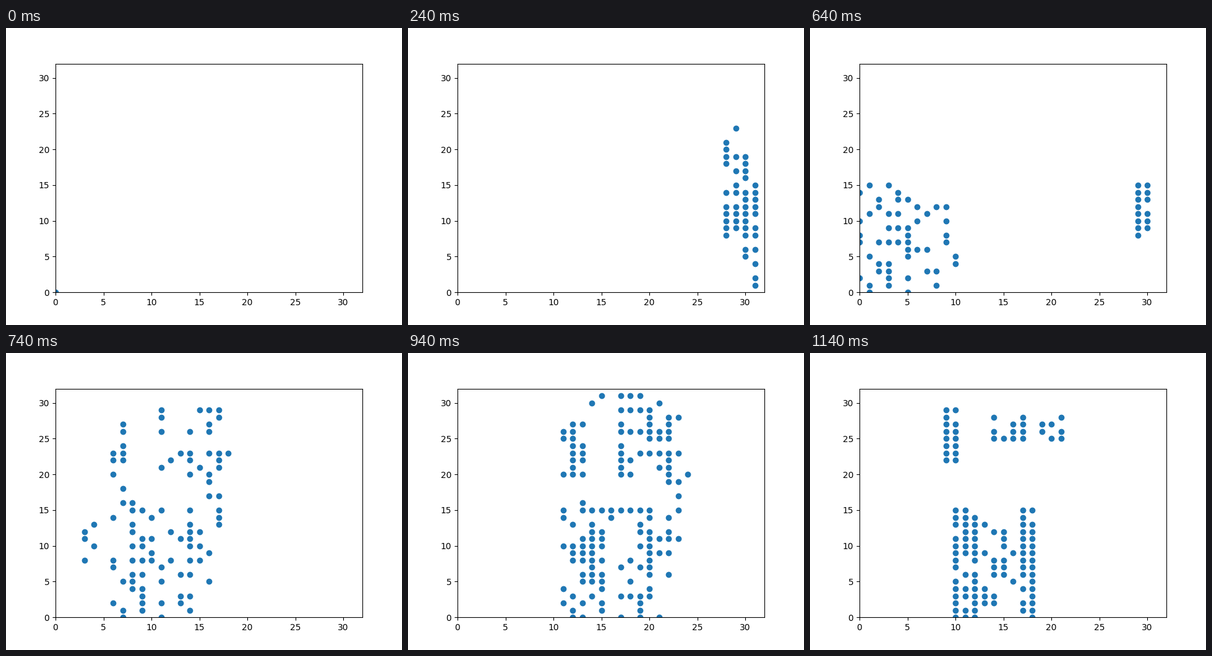
Recreate the animation shown at these times as a matplotlib script. Size 640x480 px, loop 1240 ms.

```python
import random
from itertools import product

import matplotlib.pyplot as plt
from matplotlib.animation import FuncAnimation

GRID = 32
TICK = 20      # ms per drawn frame
FIRST = 40     # ms the opening dot stays
HOLD = 100     # ms every later scan stays
SCANS = 12

rng = random.Random(7)


def thin(dots, share):
    """Keep a random share of the dots."""
    pool = sorted(dots)
    return set(rng.sample(pool, round(share * len(pool))))


def block(x0, x1, y0, y1, share=1):
    """Fill a rectangle of grid cells, both ends included."""
    return thin(product(range(x0, x1 + 1), range(y0, y1 + 1)), share)


def shift(dots, dx):
    return {((x + dx) % GRID, y) for x, y in dots}


def between(a, b, dx=0):
    """A scan halfway between two others, drifting dx columns each way."""
    a, b = shift(a, dx), shift(b, -dx)
    return (a & b) | thin(a ^ b, 0.5)


# The cloud enters at the right, wraps to the left, then breaks into bars.
edge = (block(28, 29, 8, 21, 0.65) | block(29, 29, 23, 23)
        | block(30, 30, 5, 19, 0.87) | block(31, 31, 0, 15, 0.7))

wrap = (block(29, 31, 18, 23, 0.8) | block(29, 31, 8, 14, 0.65)
        | block(0, 3, 1, 15, 0.36))

spread = (block(29, 30, 8, 15, 0.87) | block(0, 5, 0, 15, 0.37)
          | block(6, 10, 1, 12, 0.25))

centre = (block(12, 13, 20, 27, 0.85) | block(13, 14, 4, 18, 0.4)
          | block(17, 23, 26, 29, 0.85) | block(17, 24, 20, 23, 0.65)
          | block(22, 23, 9, 19, 0.6) | block(15, 15, 0, 14, 0.75)
          | block(16, 19, 2, 10, 0.4) | block(15, 19, 15, 15)
          | block(20, 20, 0, 15))

dense = (block(11, 12, 20, 27, 0.8) | block(14, 21, 29, 31, 0.65)
         | block(16, 22, 20, 27, 0.5) | block(11, 12, 0, 15, 0.75)
         | block(13, 13, 0, 15) | block(14, 14, 0, 13, 0.93)
         | block(15, 18, 0, 15, 0.27) | block(19, 19, 0, 15, 0.75)
         | block(20, 22, 0, 15, 0.4))

last = (block(9, 10, 22, 29, 0.94) | block(14, 17, 25, 28, 0.7)
        | block(19, 21, 25, 28, 0.6) | block(10, 12, 0, 15, 0.83)
        | block(13, 16, 2, 13, 0.4) | block(17, 17, 0, 15, 0.8)
        | block(18, 18, 0, 15, 0.94))

scans = [
    {(0, 0)},
    thin(edge, 0.4),
    thin(edge, 0.7),
    edge,
    between(edge, wrap),
    wrap,
    between(wrap, spread),
    spread,
    between(spread, centre, dx=6),
    centre,
    between(centre, dense),
    dense,
    last,
]

fig, ax = plt.subplots(figsize=(6.4, 4.8), dpi=100)
ax.set_xlim(0, GRID)
ax.set_ylim(0, GRID)
cloud = ax.scatter([0], [0])


def update(i):
    t = i * TICK
    k = 0 if t < FIRST else 1 + (t - FIRST) // HOLD
    cloud.set_offsets(sorted(scans[k]))
    return [cloud]


anim = FuncAnimation(fig, update, frames=(FIRST + SCANS * HOLD) // TICK,
                     interval=TICK, repeat=True, repeat_delay=0)
plt.show()
```
